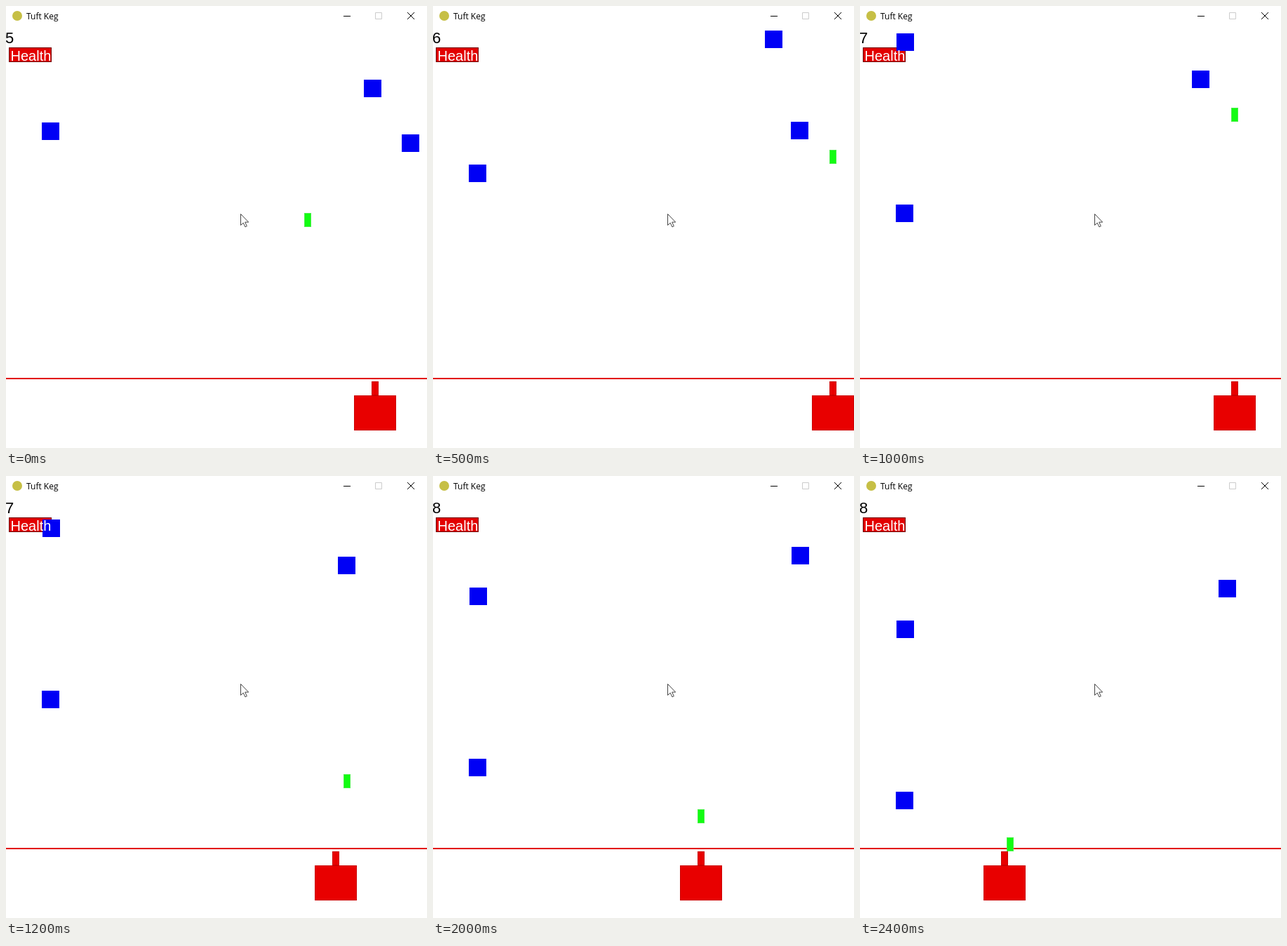
Write an HTML page with a canvas that moves like this. It is 600x630 px and loops after 2.5 s.

```html
<!DOCTYPE html>
<html lang="en">
<head>
<meta charset="utf-8">
<title>Tuft Keg</title>
<style>
html, body { margin: 0; width: 100%; height: 100%; overflow: hidden; background: #fff; }
canvas { display: block; }
</style>
</head>
<body>
<canvas id="stage" width="600" height="630"></canvas>
<script>
const ctx = document.getElementById("stage").getContext("2d");
const STEP = 100, STEPS = 25;
const TOP = 30, MUZZLE = 535, SIZE = 25, FIRST_TICK = -24;
const RED = "#e80000", BLUE = "#0000f5", GREEN = "#12fc12";

// Game ticks elapsed after every fourth step: slightly uneven, near 12 per step.
const clock = [0, 48, 94, 140, 188, 237, 284];

// Ticks between which the left key is held; the right key is held before tick 12.
const leftHeld = [[65, 74], [117, 133], [180, 202], [240, 300]];

function ticksAt(step) {
  const i = Math.floor(step / 4), a = clock[i], b = clock[i + 1] ?? a;
  return Math.round(a + (b - a) * (step % 4) / 4);
}

function direction(n) {
  if (n < 12) return 1;
  return leftHeld.some(([from, to]) => n > from && n <= to) ? -1 : 0;
}

// Replays the game up to tick `end`.
function play(end) {
  const spawnX = [473, 52, 511];
  const enemies = [[51, 142], [510, 81], [564, 159]].map(([x, y]) => ({ x, y }));
  let tank = 400, score = 5, shot = { x: tank + 25, y: MUZZLE };

  for (let n = FIRST_TICK + 1; n <= end; n++) {
    tank = Math.min(540, tank + 4 * direction(n));
    shot.y -= 10;
    if (shot.y < TOP) shot = { x: tank + 25, y: MUZZLE };
    for (const e of enemies) {
      e.y++;
      const hit = shot.x < e.x + SIZE && shot.x + 10 > e.x &&
                  shot.y < e.y + SIZE && shot.y + 20 > e.y;
      if (hit) {
        e.x = spawnX.shift();
        e.y = TOP;
        score++;
      }
    }
  }
  return { tank, shot, enemies, score };
}

function rect(color, x, y, w, h, edge) {
  ctx.fillStyle = color;
  ctx.fillRect(x, y, w, h);
  if (!edge) return;
  ctx.strokeStyle = edge;
  ctx.strokeRect(x + 0.5, y + 0.5, w - 1, h - 1);
}

function text(str, x, y, color, font) {
  ctx.fillStyle = color;
  ctx.font = font;
  ctx.fillText(str, x, y);
}

function stroke(path, color, fill) {
  const p = new Path2D(path);
  if (fill) { ctx.fillStyle = fill; ctx.fill(p); }
  ctx.strokeStyle = color;
  ctx.stroke(p);
}

function drawTitleBar() {
  ctx.fillStyle = "#c6bf45";
  ctx.beginPath();
  ctx.arc(16, 14, 7, 0, 2 * Math.PI);
  ctx.fill();
  text("Tuft Keg", 29, 19, "#000", "12px 'Open Sans', 'Noto Sans', sans-serif");
  stroke("M481 14.5h10", "#000");
  stroke("M526.5 9.5h9v9h-9z", "#ccc");
  stroke("M572 9l10 10M582 9l-10 10", "#000");
}

function draw(step) {
  const { tank, shot, enemies, score } = play(ticksAt(step));

  rect("#fff", 0, 0, 600, 630);
  rect("#e20000", 4, 59, 61, 21, "#700000");
  rect("#e20000", 0, 530, 600, 2);
  rect(RED, tank, 555, 60, 50, "#cc0000");
  rect(RED, tank + 25, MUZZLE, 10, 20, "#cc0000");
  rect(GREEN, shot.x, shot.y, 10, 20, "#4cf04c");
  for (const { x, y } of enemies) rect(BLUE, x, y, SIZE, SIZE);

  text(score, -1, 53, "#000", "22px 'Liberation Sans', Arial, sans-serif");
  text("Health", 6.5, 78, "#fff", "20px 'Liberation Sans', Arial, sans-serif");
  drawTitleBar();
  stroke("M334.5 296.5v16l3.7-3.4 2.7 5.8 2.4-1.1-2.6-5.7h5z", "#444", "#fff");
}

const start = performance.now();
function loop() {
  draw(Math.floor((performance.now() - start) / STEP) % STEPS);
  requestAnimationFrame(loop);
}
loop();
</script>
</body>
</html>
```
